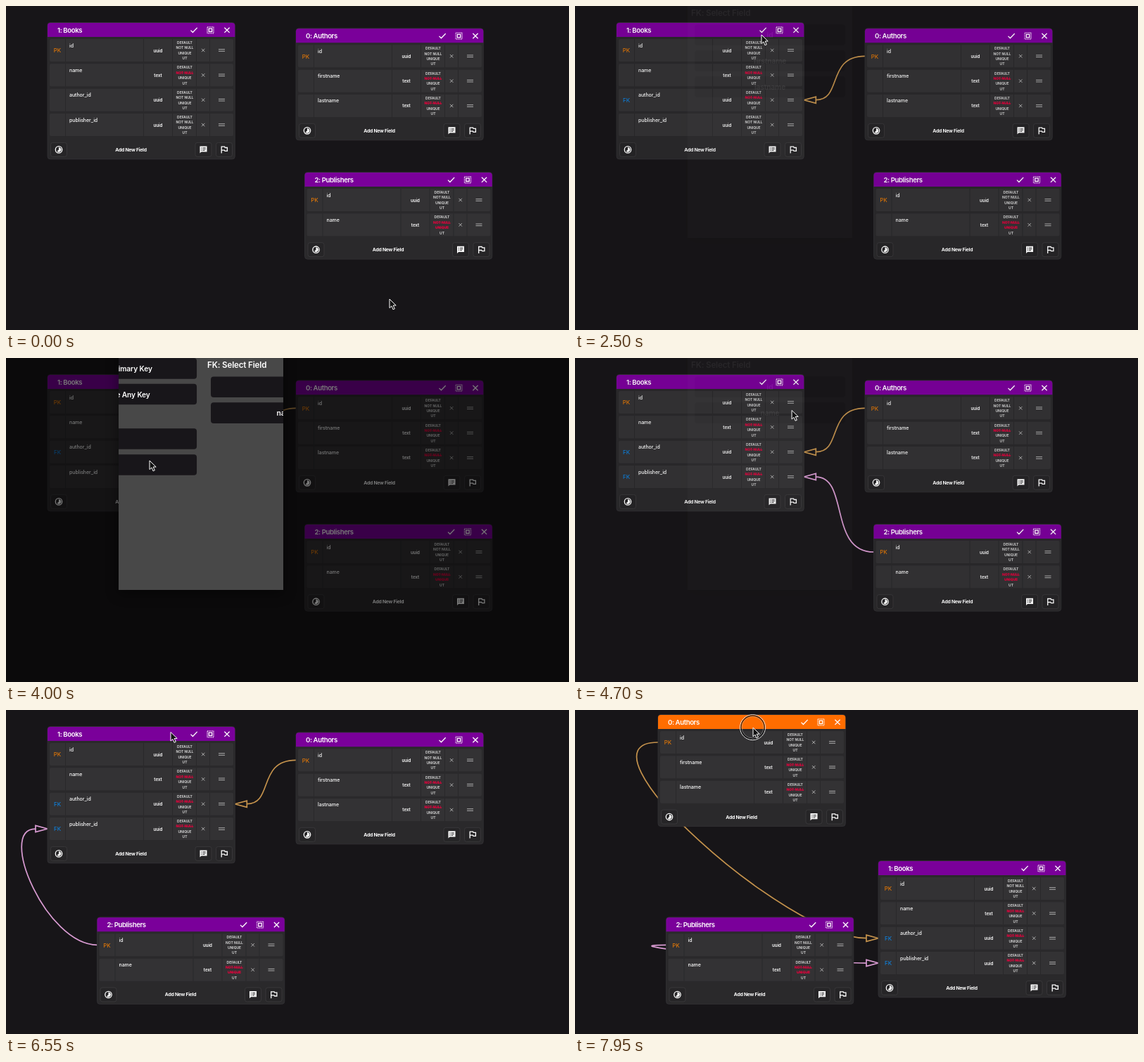
An HTML page for the animation above (8 s loop, 800 px wide and 461 px high).

```html
<!DOCTYPE html>
<html lang="en">
<head>
<meta charset="utf-8">
<title>Linking tables</title>
<style>
  html, body { margin: 0; width: 100%; height: 100%; overflow: hidden; background: #171518; }
  svg { display: block; width: 100vw; height: 100vh; font-family: Inter, sans-serif; }
  text { fill: #fff; dominant-baseline: central; text-anchor: middle; }
  .title { font-size: 9.6px; font-weight: 600; letter-spacing: -.4px; text-anchor: start; }
  .key { font-size: 8px; }
  .name { font-size: 7px; font-weight: 500; letter-spacing: -.05px; text-anchor: start; }
  .type { font-size: 6.2px; font-weight: 600; letter-spacing: -.05px; }
  .flag { font-size: 5px; font-weight: 700; letter-spacing: -.05px; fill: #cfcfcf; }
  .off { fill: #e8003c; text-decoration: line-through; }
  .add { font-size: 6.8px; font-weight: 700; letter-spacing: -.25px; }
  .button { font-size: 10.2px; font-weight: 600; letter-spacing: -.1px; }
  .heading { font-size: 11.6px; font-weight: 600; letter-spacing: -.15px; text-anchor: start; }
  .option { font-size: 11.5px; text-anchor: start; }
  .icon { fill: none; stroke: #fff; stroke-width: 1.3; }
</style>
</head>
<body>
<svg id="stage" viewBox="0 0 800 461" preserveAspectRatio="none"></svg>
<script>
const LOOP = 8000, CARD_W = 266.3, ROW = 35.35, MODAL_W = 234;
const stage = document.getElementById('stage');

const clamp = (v, a, b) => Math.min(b, Math.max(a, v));
const smooth = p => p * p * (3 - 2 * p);
const ramp = (t, from, to) => smooth(clamp((t - from) / (to - from), 0, 1));

// Cursor stops: time, x, y; "linear" keeps the speed through the stop.
const stops = [
  [0, 545, 417], [750, 73, 133], [900, 73, 133],
  [1500, 231, 115], [1740, 231, 115],
  [2150, 277, 44], [2300, 277, 44], [2500, 265, 41],
  [3100, 73, 169], [3300, 73, 169],
  [3720, 204, 146], [4000, 204, 146],
  [4300, 277, 42], [4500, 277, 42],
  [5300, 474, 248], [5430, 474, 248],
  [5600, 462.2, 251.3], [5950, 387, 313, 'linear'], [6250, 179, 306.3],
  [6310, 179, 306.3], [6550, 234, 31.5], [6700, 234, 31.5],
  [7400, 606, 222.5], [7440, 606, 222.5],
  [7590, 547, 50.5], [7640, 547, 50.5], [7950, 253, 25.2], [8000, 253, 25.2]
];
const presses = [
  [790, 930], [1620, 1790], [2200, 2330], [3160, 3320], [3740, 3880],
  [4380, 4520], [5340, 6290], [6640, 7430], [7600, 8000]
];
const dialogs = [
  { open: 820, slide: 1774, close: 2290, row: 0, fields: ['id', 'firstname', 'lastname'] },
  { open: 3350, slide: 3874, close: 4490, row: 1, fields: ['id', 'name'] }
];
const field = (name, type, off = '', key = '', linkAt = Infinity) => ({ name, type, off, key, linkAt });
const cards = {
  authors: {
    title: '0: Authors', x: 412, y: 32.3, drag: [7620, 8000],
    fields: [field('id', 'uuid', '', 'PK'), field('firstname', 'text', 'NOT NULL'), field('lastname', 'text', 'NOT NULL')]
  },
  books: {
    title: '1: Books', x: 59, y: 24, drag: [6660, 7430],
    fields: [field('id', 'uuid', '', 'PK'), field('name', 'text', 'NOT NULL'),
      field('author_id', 'uuid', '', '', 2280), field('publisher_id', 'uuid', '', '', 4480)]
  },
  publishers: {
    title: '2: Publishers', x: 424.5, y: 237, drag: [5360, 6290],
    fields: [field('id', 'uuid', '', 'PK'), field('name', 'text', 'NOT NULL UNIQUE')]
  }
};

function cursorAt(t) {
  const i = Math.max(1, stops.findIndex(s => s[0] > t));
  const [t0, x0, y0] = stops[i - 1], [t1, x1, y1, mode] = stops[i];
  const p = (t - t0) / (t1 - t0), k = mode ? p : smooth(p);
  return { x: x0 + (x1 - x0) * k, y: y0 + (y1 - y0) * k };
}

function cardAt({ x, y, drag: [from, to] }, t) {
  const grab = cursorAt(from), now = cursorAt(clamp(t, from, Math.min(to, LOOP - 1)));
  return { x: x + now.x - grab.x, y: y + now.y - grab.y };
}

const text = (x, y, cls, s, extra = '') => `<text x="${x}" y="${y}" class="${cls}" ${extra}>${s}</text>`;
const rect = (x, y, w, h, fill, r = 0, extra = '') =>
  `<rect x="${x}" y="${y}" width="${w}" height="${h}" rx="${r}" fill="${fill}" ${extra}/>`;
const group = (x, y, body, extra = '') => `<g transform="translate(${x} ${y})" ${extra}>${body}</g>`;
const icon = (d, extra = '') => `<path class="icon" d="${d}" ${extra}/>`;

const icons = {
  check: icon('M-4.5 .3L-1.6 3.2L4.7-3.4'),
  select: icon('M-4.5-4.5H4.5V4.5H-4.5Z', 'stroke-dasharray="1.2 1.05"') + icon('M-2.2-2.2H2.2V2.2H-2.2Z'),
  close: icon('M-3.6-3.6L3.6 3.6M3.6-3.6L-3.6 3.6'),
  lapse: '<circle class="icon" r="4.7"/><path fill="#fff" d="M0-3.4A3.4 3.4 0 1 1-2.4 2.4L0 0Z"/>',
  note: '<path fill="#fff" d="M-5-5H5V3.2H-3L-5 5.2Z"/>' +
    icon('M-3.2-2.7H-2M-3.2-.8H-2M-3.2 1.1H-2M-1-2.7H3.3M-1-.8H3.3M-1 1.1H2', 'style="stroke:#2a292b;stroke-width:.9"'),
  flag: icon('M-3.8 5.2V-4.2H.6L1.2-2.9H4.4V2H1L.4 .8H-3.8')
};

function rowSvg(f, i, t) {
  const y = 39 + ROW * i, linked = t >= f.linkAt;
  const key = linked ? 'FK' : f.key, off = linked ? 'NOT NULL' : f.off;
  const flags = ['DEFAULT', 'NOT NULL', 'UNIQUE', 'UT'].map((s, n) =>
    text(195, y - 11 + 7.4 * n, off.includes(s) ? 'flag off' : 'flag', s)).join('');
  return rect(3, y - 16, 261, 32, '#333234', 2) +
    `<path d="M25.5 ${y - 16}v32M136.5 ${y - 16}v32M177.5 ${y - 16}v32M211.5 ${y - 16}v32M230.5 ${y - 16}v32" stroke="#29282a"/>` +
    text(14, y + .3, 'key', key, `style="fill:${linked ? '#0a8af0' : '#f98000'}"`) +
    text(31, y - 7, 'name', f.name) + text(157, y, 'type', f.type) + flags +
    `<path d="M219 ${y - 2.2}l4.4 4.4m0-4.4l-4.4 4.4M243 ${y - 1.3}h9m-9 2.6h9" stroke="#bbb" stroke-width=".9"/>`;
}

function cardSvg(card, t) {
  const { x, y } = cardAt(card, t), foot = 39 + ROW * card.fields.length;
  const held = t >= card.drag[0] && t < card.drag[1];
  const button = (bx, name) =>
    rect(bx - 11.5, foot - 10, 23, 20, '#262527', 3, 'stroke="#3d3c3e" stroke-width=".8"') + group(bx, foot, icons[name]);
  return group(x, y,
    rect(0, -.5, CARD_W, foot + 14, '#2a292b', 4, 'stroke="#343336" stroke-width=".8"') +
    `<path d="M0 20V4Q0 0 4 0H${CARD_W - 4}q4 0 4 4V20Z" fill="${held ? '#ff6d00' : '#7a009a'}"/>` +
    text(14, 10, 'title', card.title) +
    group(208, 10.3, icons.check) + group(231.5, 10.3, icons.select) + group(255, 10.3, icons.close) +
    card.fields.map((f, i) => rowSvg(f, i, t)).join('') +
    button(16, 'lapse') + text(118.5, foot, 'add', 'Add New Field') + button(221.5, 'note') + button(251, 'flag'));
}

// Curve from a primary key to a foreign key, ending in a hollow head.
function linkSvg(card, row, color, t) {
  if (t < cards.books.fields[row].linkAt) return '';
  const from = cardAt(card, t), to = cardAt(cards.books, t);
  const side = from.x > to.x + CARD_W + 17 ? 1 : -1;
  const x0 = from.x, y0 = from.y + 39;
  const tip = to.x + (side > 0 ? CARD_W : 0), base = tip + 17 * side, y1 = to.y + 39 + ROW * row;
  const pull = 30 + .235 * Math.hypot(tip - x0, y1 - y0);
  return `<g fill="none" stroke="${color}" stroke-width="1.7">
    <path d="M${x0} ${y0}C${x0 - pull} ${y0} ${tip + pull * side} ${y1} ${base} ${y1}"/>
    <path d="M${tip} ${y1}L${base} ${y1 - 4.6}V${y1 + 4.6}Z"/></g>`;
}

function dialogSvg(d, t) {
  const shown = ramp(t, d.open, d.open + 230) * (1 - ramp(t, d.close, d.close + 250));
  if (shown <= 0) return '';
  const shift = MODAL_W * ramp(t, d.slide, d.slide + 260);
  const box = (y, fill = '#18161a') => rect(10, y - 14.8, 214, 29.6, fill, 4);
  const wide = (y, s) => box(y) + text(117, y, 'button', s);
  const options = ['0: Authors', '2: Publishers'].map((s, i) => {
    const y = 115 + 37 * i, pressed = i === d.row && t > d.slide - 150 && t < d.slide;
    return box(y, pressed ? '#353436' : '#18161a') +
      text(17, y + .3, 'option', s, pressed ? 'style="fill:#c8c8c8"' : '');
  }).join('');
  const tables = wide(15, 'Make Primary Key') + wide(51.5, 'Remove Any Key') +
    text(5, 84, 'heading', 'FK: Select Table') + options;
  const fields = text(5, 10, 'heading', 'FK: Select Field') +
    d.fields.map((s, i) => wide(41.3 + 36.8 * i, s)).join('');
  return `<g opacity="${shown}">` + rect(0, 0, 800, 461, '#000', 0, 'opacity=".53"') +
    rect(160, -20, MODAL_W, 350, '#484848', 0, 'style="filter:drop-shadow(0 5px 9px rgba(0,0,0,.45))"') +
    `<g clip-path="url(#modal)">${group(160 - shift, 0, tables)}${group(160 + MODAL_W - shift, 0, fields)}</g></g>`;
}

function pointerSvg(t) {
  const { x, y } = cursorAt(t);
  const ring = presses.some(([a, b]) => t >= a && t < b)
    ? group(-.5, -.5, '<circle r="18" fill="none" stroke="#e8e8e8"/>' +
      '<circle r="16.6" fill="none" stroke="#000" stroke-opacity=".65" stroke-width="1.6"/>' +
      '<circle r="15.5" fill="none" stroke="#ddd" stroke-opacity=".55" stroke-width=".7"/>')
    : '';
  return group(x, y, ring +
    '<path d="M0 0V12.6L2.9 9.9L5 14.8L7.3 13.8L5.2 9H9.2Z" fill="#111" stroke="#fff" stroke-width="1"/>');
}

function draw(now) {
  const t = now % LOOP, { authors, books, publishers } = cards;
  stage.innerHTML =
    `<clipPath id="modal">${rect(160, 0, MODAL_W, 330, '#000')}</clipPath>` +
    rect(0, 0, 800, 461, '#171518') +
    linkSvg(authors, 2, '#c4924c', t) + linkSvg(publishers, 3, '#d99bd2', t) +
    [authors, books, publishers].map(c => cardSvg(c, t)).join('') +
    dialogs.map(d => dialogSvg(d, t)).join('') + pointerSvg(t);
}

const start = performance.now();
function tick() {
  draw(performance.now() - start);
  requestAnimationFrame(tick);
}
tick();
</script>
</body>
</html>
```
